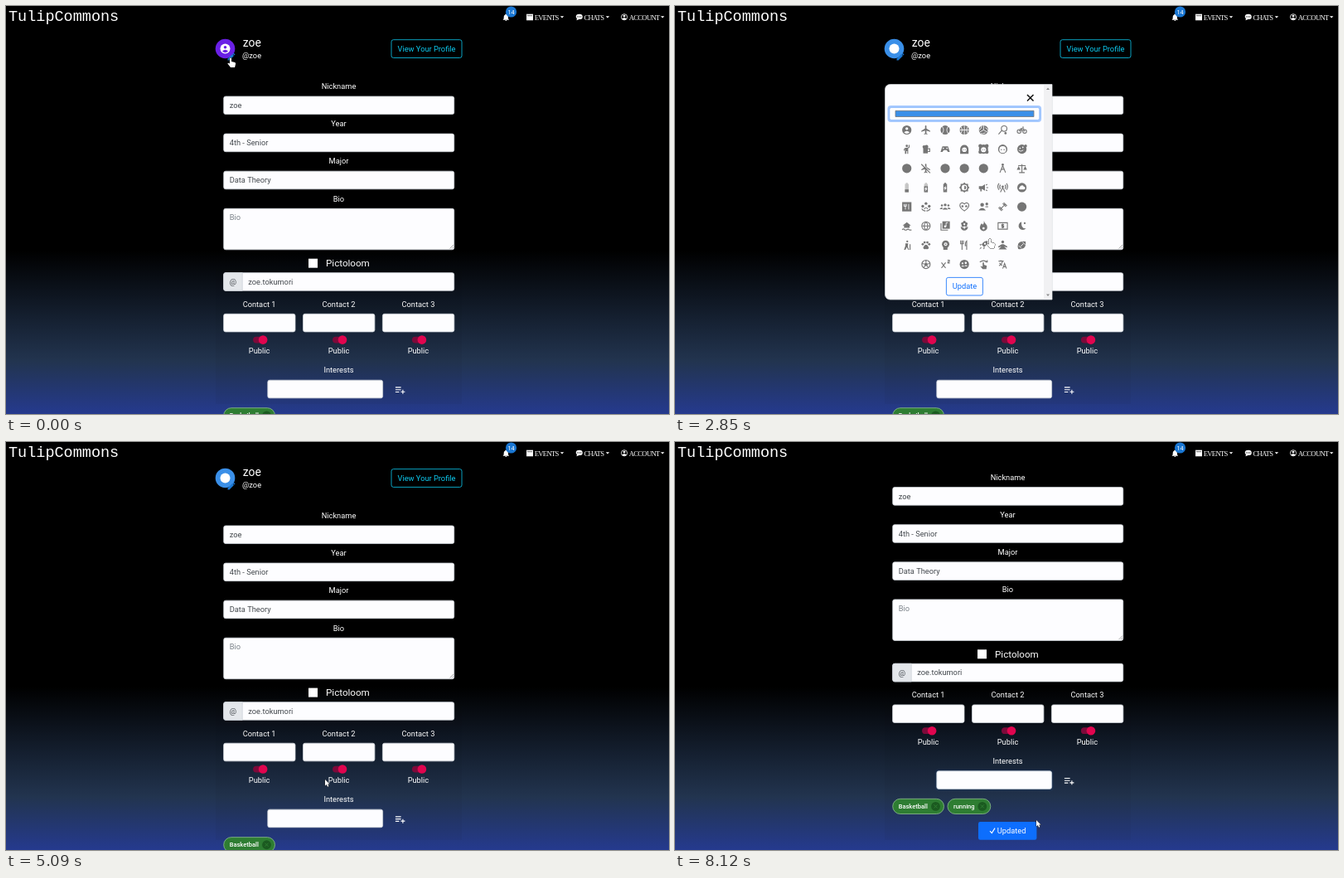
An HTML page with a canvas for the animation above (8150 ms loop, 800 by 492 pixels).

```html
<!DOCTYPE html>
<html lang="en">
<head>
<meta charset="utf-8">
<title>Profile editor</title>
<style>
html, body { margin: 0; width: 100%; height: 100%; overflow: hidden; background: #000; }
canvas { display: block; width: 800px; height: 492px; }
</style>
</head>
<body>
<canvas id="stage"></canvas>
<script>
const W = 800, H = 492, LOOP = 8150, SCROLL = 54.4;
const cv = document.getElementById('stage');
const g = cv.getContext('2d');
const dpr = window.devicePixelRatio || 1;
cv.width = W * dpr;
cv.height = H * dpr;

const SANS = 'Roboto, "Open Sans", sans-serif';
const MONO = '"Courier New", "Liberation Mono", monospace';
const SERIF = '"Liberation Serif", "Times New Roman", serif';
const GREY = '#757575', INK = '#43484d', BLUE = '#0d6efd', PAPER = '#fdfdff';

// Icon parts on a 24-unit grid: O disc, C dot, D cut-out dot,
// F fill, E pale fill, S stroke, V cut-out fill, W cut-out stroke.
const plane = 'F M21 16v-2l-8-5V3.5a1.5 1.5 0 0 0-3 0V9l-8 5v2l8-2.5V19l-2 1.5V22l3.5-1 3.5 1v-1.5L13 19v-5.5z';
const ring = 'S M3 12a9 9 0 1 0 18 0a9 9 0 1 0-18 0';
const account = 'O|D 12 9 3|V M6 17q6-5.500 12 0q-6 6-12 0z';
const eyes = '|C 10 13 1|C 14 13 1';
const dot = 'O';
const listAdd = 'S M2 7h12M2 12h12M2 17h8M18 12v9M13.500 16.500h9';
const pencil = 'F M3 17v4h4L18 10l-4-4zM15 5l4 4 2-2-4-4z';
const bell = 'F M12 22a2 2 0 0 0 2-2h-4q0 2 2 2zM18 16v-5q0-5-4-6V3h-4v2q-4 1-4 6v5l-2 2v1h16v-1z';
const battery = 'E M8 4h2V2h4v2h2v18H8z';

const rows = [
  [account, plane,
    'O|W M5 4q7 8 0 16M19 4q-7 8 0 16',
    'O|W M2 12h20M12 2v20M5 5q5 7 0 14M19 5q-5 7 0 14',
    'O|W M12 12V2M12 12l-9 5M12 12l9 5M8 3q0 7-6 10M16 7q6 3 6 8M16 18q-6 3-10 2',
    'S M9 9a6 6 0 1 0 12 0a6 6 0 1 0-12 0M10 13l-7 8|C 18 19 2.500',
    'S M2 15a4 4 0 1 0 8 0a4 4 0 1 0-8 0M14 15a4 4 0 1 0 8 0a4 4 0 1 0-8 0M6 15l4-6h5l3 6M10 9l3 5M13 6h3'],
  ['C 12 5 2.500|F M8 9h7v13h-2v-6h-2v6H8z|S M17 3v5l-4 2M8 10l-2 5',
    'F M6 9h10v12H6z|C 8 7 3.500|C 13 7 4|S M16 11h4v6h-4',
    'F M6 6h12l4 12h-4l-3-4H9l-3 4H2z|D 8 10 1.500|D 16 10 1.500',
    'F M3 22V12a9 9 0 0 1 18 0v10z|D 12 13 5' + eyes,
    'O|C 5 5 4|C 19 5 4|C 5 18 4|C 19 18 4|D 12 13 5.500' + eyes,
    'O|D 12 13 7.300|C 9 13 1.300|C 15 13 1.300',
    'O|C 20 5 3|W M5 14q4 5 10 0|D 8 10 1.500|D 14 8 1.500'],
  [dot, plane + '|W M4 2l18 18|S M2 3l19 19', dot, dot, dot,
    'S M12 6L6 21M12 6l6 15M9 14h6|C 12 4 2.500',
    'S M12 3v18M4 6h16M6 21h12|F M1 15l4-8 4 8zM15 15l4-8 4 8z'],
  [battery + '|F M8 16h8v6H8z',
    battery + '|F M8 9h8v13H8z|V M13 10l-4 5h2v5l4-6h-2z',
    'F M8 4h2V2h4v2h2v18H8z|V M13 8l-4 6h2v5l4-7h-2z',
    'F M12 1l3.300 3H20v4.700L23 12l-3 3.300V20h-4.700L12 23l-3.300-3H4v-4.700L1 12l3-3.300V4h4.700z|D 12 12 6|F M12 8a4 4 0 0 1 0 8z',
    'F M2 9h7l6-4v14l-6-4H8v5H5v-5H2z|S M18 12h4M17 7l3-2M17 17l3 2',
    'S M12 12L7 22M12 12l5 10M7 6q-3 4 0 9M17 6q3 4 0 9M4 3q-5 7 0 14M20 3q5 7 0 14|C 12 10 2.500',
    'O|V M8 16h8a3 3 0 0 0 0-6a4.500 4.500 0 0 0-8.500 1a2.600 2.600 0 0 0 .500 5z'],
  ['F M2 2h20v20H2z|W M9 6v12M16 6v12M6 6v5h5V6',
    'C 12 5 3|C 5 11 3|C 19 11 3|S M3 16q2 5 8 5M21 16q-2 5-8 5M8 17q4-6 8 0',
    'C 12 8 3|C 5 9 2.200|C 19 9 2.200|F M6 18q6-8 12 0zM0 17q4-6 7-2l-2 2zM24 17q-4-6-7-2l2 2z',
    'S M12 21Q0 13 3 6q4-5 9 0q5-5 9 0q3 7-9 15z|C 8 11 2.300|C 16 11 2.300',
    'C 9 8 4|F M1 20q8-11 16 0z|C 19 6 3|S M16 12h6',
    'S M7 17L17 7M3 14l7 7M5 12l7 7M12 5l7 7M14 3l7 7', dot],
  ['F M12 4l9 7h-3v5H6v-5H3z|S M2 20q3-3 5 0q3 2 5 0q3-2 5 0q3 2 5 0',
    ring + 'M3 12h18M12 3q-8 9 0 18M12 3q8 9 0 18',
    'F M6 2h16v16H6z|S M3 6v15h15|D 12 13 2.300|W M14 13V5h4',
    'C 12 4 3|C 8 7 3|C 16 7 3|C 9 11 3|C 15 11 3|D 12 8 2|F M4 14q1 8 8 8q7 0 8-8q-6 0-8 5q-2-5-8-5z',
    'F M13 1q1 5 4 7t3 7a8 8 0 0 1-16 0q0-5 4-9q1 3 3 3q2-3 2-8z|D 12 17 2.500',
    'S M2 5h20v14H2zM15 9h-5v3h4v3h-5M12 7v10',
    'F M11 3a9 9 0 1 0 10 14q-11 2-10-14z|C 18 6 2'],
  ['C 13 4 2|F M9 8h6l-1 7 3 7h-2l-3-6-3 6H6l3-9z|S M19 10v12',
    'C 5 10 2.500|C 9 6 2.500|C 15 6 2.500|C 19 10 2.500|F M12 11q3 0 6 6q0 5-6 3q-6 2-6-3q3-6 6-6z',
    'C 13 10 8|F M8 14h9v8H8z|D 13 10 3.500|C 13 10 1.500',
    'S M7 2v20M4 2v7h6V2M17 22V3q-3 2-3 10h3',
    'F M21 3q-9 0-13 8l5 5q8-4 8-13zM8 9l-5 2 3 2zM15 16l-2 5-2-3zM6 16l2 2-5 3z|D 15 9 2',
    'C 12 5 3|F M2 15l8-5h4l8 5-1 2-6-2 6 6H3l6-6-6 2z',
    'F M20 4Q8 2 4 9q-2 5 0 11q11 2 15-5q2-5 1-11z|W M9 15l6-6M5 13l6 6M13 5l6 6'],
  [ring + 'M12 8V4M16 11l4-1M14 15l3 4M10 15l-3 4M8 11l-4-1|F M12 8l4 3-1.500 4.500h-5L8 11z',
    'S M4 8l9 12M13 8L4 20M17 3h4v3h-3v3h4',
    'O|D 8 10 2|D 15 9 2.300|V M5 17q4-5 7 0zM12 16q3-5 7 0z',
    'S M4 7q8-6 16 0M20 3v4h-4|F M10 8h3v5l6 2-1 7h-8l-5-6 5 1z',
    'S M3 5h11M8 3v2M12 5q-2 7-8 10M5 9q3 4 6 5M12 21l4-11 4 11M13.500 17h5']
];
const cells = rows.flatMap((row, j) => row.map((art, i) =>
  ({ art, x: 279.7 + 23.15 * (i + (j === 7 ? 1 : 0)), y: 149.5 + 23.15 * j })));
const picked = cells[34];

// Pointer stops: time, x, y, shape until the next stop.
const stops = [
  [0, 271, 63, 'hand'], [200, 271, 63, 'arrow'], [560, 380, 180, 'hand'], [800, 419, 240, 'hand'],
  [960, 419, 240, 'hand'], [1270, 374, 141, 'hand'], [1430, 352, 129, 'arrow'], [1600, 352, 129, 'arrow'],
  [1800, 345, 210, 'arrow'], [2400, 400, 216, 'arrow'], [2550, 400, 216, 'hand'], [2850, 380, 281, 'hand'],
  [3150, 350, 336, 'hand'], [3500, 350, 336, 'arrow'], [4150, 390, 237, 'arrow'], [4400, 390, 237, 'arrow'],
  [4950, 385, 407, 'arrow'], [5250, 385, 407, ''], [7200, 400, 410, ''], [7380, 458, 409, 'arrow'],
  [7550, 475, 407, 'hand'], [7975, 475, 407, 'arrow'], [8120, 436, 456, 'arrow'], [LOOP, 436, 456, 'arrow']
];

const clamp = v => Math.max(0, Math.min(1, v));
const span = (t, a, b) => clamp((t - a) / (b - a));
const ease = v => v * v * (3 - 2 * v);
const mix = (a, b, p) => a + (b - a) * p;

function circle(x, y, r, color) {
  g.fillStyle = color;
  g.beginPath();
  g.arc(x, y, r, 0, 7);
  g.fill();
}

function box(x, y, w, h, r, fill, edge) {
  g.beginPath();
  g.roundRect(x, y, w, h, r);
  if (fill) { g.fillStyle = fill; g.fill(); }
  if (edge) { g.strokeStyle = edge; g.lineWidth = 0.8; g.stroke(); }
}

function line(d, color, width) {
  g.strokeStyle = color;
  g.lineWidth = width;
  g.stroke(new Path2D(d));
}

function text(s, x, y, { size = 9.28, color = '#fff', align = 'left', font = SANS, weight = 400, gap = 0 } = {}) {
  g.font = `${weight} ${size}px ${font}`;
  g.letterSpacing = gap + 'px';
  g.textAlign = align;
  g.fillStyle = color;
  g.fillText(s, x, y + size * 0.355);
  g.letterSpacing = '0px';
}
const label = (s, x, y, size) => text(s, x, y, { align: 'center', size });

function icon(art, x, y, k, fg, bg) {
  g.save();
  g.translate(x - 12 * k, y - 12 * k);
  g.scale(k, k);
  for (const part of art.split('|')) {
    const kind = part[0], rest = part.slice(2);
    if (kind === 'O') circle(12, 12, 10, fg);
    else if (kind === 'C' || kind === 'D') {
      const [cx, cy, r] = rest.split(' ').map(Number);
      circle(cx, cy, r, kind === 'C' ? fg : bg);
    } else if (kind === 'S' || kind === 'W') line(rest, kind === 'S' ? fg : bg, kind === 'S' ? 2 : 1.5);
    else {
      g.fillStyle = kind === 'V' ? bg : kind === 'E' ? '#c6c6c6' : fg;
      g.fill(new Path2D(rest));
    }
  }
  g.restore();
}

function field(x, y, w, h, glow = 0) {
  if (glow > 0) box(x - 2.3, y - 2.3, w + 4.6, h + 4.6, 4, `rgba(13,110,253,${0.36 * glow})`);
  box(x, y, w, h, 2.3, PAPER, glow > 0 ? `rgba(${mix(206, 134, glow)},${mix(212, 183, glow)},${mix(218, 254, glow)},1)` : '#ced4da');
}

function chip(s, x, w) {
  box(x, 484.7, w, 18.2, 9.1, '#2e7d32', '#8fbf8f');
  text(s, x + 7, 493.8, { size: 7.5, weight: 500 });
  circle(x + w - 10, 493.8, 5.4, '#1b5a20');
  const a = x + w - 12;
  line(`M${a} 491.8l4 4m0-4l-4 4`, '#2e7d32', 1);
}

function backdrop() {
  const sky = g.createLinearGradient(0, 0, 0, H);
  sky.addColorStop(0, '#000');
  sky.addColorStop(0.6, '#000');
  sky.addColorStop(0.87, '#22344f');
  sky.addColorStop(1, '#253a8e');
  g.fillStyle = sky;
  g.fillRect(0, 0, W, H);
  g.fillStyle = 'rgba(0,0,0,.04)';
  g.fillRect(253, 0, 297, 480);
}

function page(t, tint) {
  circle(264.5, 51.5, 11.8, tint);
  icon(t < 900 ? account : dot, 264.5, 51.5, 0.6, '#fff', tint);
  icon(pencil, 272, 61, 0.5, '#1976d2');
  text('zoe', 285.7, 44.5, { size: 13.9 });
  text('@zoe', 285, 60);
  box(465, 40.7, 85, 21.8, 2.5, null, '#0dcaf0');
  text('View Your Profile', 507.5, 51.5, { color: '#0dcaf0', align: 'center' });

  [['Nickname', 'zoe'], ['Year', '4th - Senior'], ['Major', 'Data Theory']].forEach(([name, value], i) => {
    const y = 97 + 45.1 * i;
    label(name, 401.5, y);
    field(262.7, y + 12, 278, 21.6);
    text(value, 269.7, y + 22.7, { color: INK });
  });
  label('Bio', 401.5, 232.3);
  field(262.7, 244.3, 278, 49.5);
  text('Bio', 269.7, 255, { color: '#7b8289' });
  line('M535.500 292.500l4.500-4.500m-2 4.500l2-2', '#777', 0.6);

  g.fillStyle = '#fff';
  g.fillRect(365, 304.7, 11, 11);
  text('Pictoloom', 386, 310.3, { size: 11.6 });
  field(262.7, 321.7, 278, 21.6);
  box(262.7, 321.7, 22.5, 21.6, [2.3, 0, 0, 2.3], '#e4e7eb', '#ced4da');
  text('@', 274, 332.7, { color: INK, align: 'center' });
  text('zoe.tokumori', 292.3, 332.3, { color: INK });

  for (let i = 0; i < 3; i++) {
    const x = 305.6 + 95.9 * i;
    label('Contact ' + (i + 1), x, 359.3);
    field(x - 43, 371.3, 86.4, 21.6);
    box(x - 7.5, 398.7, 17, 7.8, 3.9, '#7d0a3a');
    circle(x + 4.5, 402.6, 5.3, '#e0054f');
    label('Public', x, 416);
  }

  label('Interests', 401.5, 439.2);
  const focus = span(t, 5320, 5480) * (1 - span(t, 7975, 8140));
  field(315.8, 451.2, 138.8, 21.6, focus);
  const typed = t < 7975 ? 'running'.slice(0, Math.max(0, Math.floor((t - 5800) / 150))) : '';
  text(typed, 323, 462, { color: INK });
  const since = t < 5950 ? t - 5300 : t < 6850 ? 0 : t - 6850;
  if (t >= 5300 && t < 7975 && since % 1000 < 500) {
    g.fillStyle = '#222';
    g.fillRect(323.2 + g.measureText(typed).width, 456, 0.8, 12);
  }
  if (t > 7500 && t < 8100) circle(475.5, 462.7, 11.6, 'rgba(255,255,255,.05)');
  icon(listAdd, 475.5, 462.7, 0.56, '#fff');

  chip('Basketball', 262.7, 61.8);
  if (t >= 7975) chip('running', 329, 51.8);
  box(366, 512.5, 70.4, 21.6, 2.3, BLUE);
  line('M380 523.500l2.300 2.500l3.700-6', '#fff', 1.1);
  text('Updated', 388.8, 523.2);
}

function navItem(s, x, art) {
  icon(art, x, 13.3, 0.4, '#fff', '#000');
  text(s, x + 5.8, 13.5, { size: 8.6, font: SERIF, gap: -0.7 });
}

function nav() {
  g.fillStyle = '#000';
  g.fillRect(0, 0, W, 27);
  text('TulipCommons', 3, 11.3, { size: 18.5, font: MONO });
  icon(bell, 603.3, 13.6, 0.44, '#fff');
  circle(609.5, 7, 6.6, '#1976d2');
  label('14', 609.5, 7.1, 7.2);
  navItem('EVENTS', 632, 'F M2 3h20v19H2z|W M4 8h16');
  navItem('CHATS', 691.7, 'F M12 3q10 0 10 8t-10 8l-8 3 1-6q-3-2-3-5q0-8 10-8z|D 7 11 1.500|D 12 11 1.500|D 17 11 1.500');
  navItem('ACCOUNT', 746, ring + '|C 12 9 3.500|F M5 18q7-7 14 0q-7 5-14 0z');
  g.fillStyle = '#fff';
  for (const x of [668.8, 723.7, 790]) g.fill(new Path2D(`M${x} 12.200h4.400l-2.200 2.300z`));
}

function picker(t, tint, p, pos) {
  const L = 253.5, T = 94.5;
  g.save();
  g.globalAlpha = p;
  g.translate(L, T);
  g.scale(mix(0.75, 1, p), mix(0.5625, 1, p));
  g.translate(-L, -T);
  box(L, T, 201.5, 259.5, [6, 0, 0, 6], PAPER, '#cfd2d6');
  g.fillStyle = '#f1f1f3';
  g.fillRect(445, 95, 9.7, 258.6);
  g.fillStyle = '#8a8a8a';
  g.fill(new Path2D('M448 101h4l-2-2.500zM448 347.500h4l-2 2.500z'));
  line('M425 107l7.500 7.500m0-7.500l-7.500 7.500', '#111', 1.5);

  field(258.8, 122.4, 181, 15.2, span(t, 1450, 1600));
  box(266, 126.3, 167, 7.2, 0, tint, '#777');

  for (const c of cells) {
    if (c === picked && t > 900 && t < 1450) circle(c.x, c.y, 10.6, 'rgba(0,0,0,.065)');
    else if (pos.shape === 'hand' && Math.hypot(c.x - pos.x, c.y - pos.y) < 10) circle(c.x, c.y, 10.6, 'rgba(0,0,0,.045)');
    icon(c.art, c.x, c.y, 0.56, GREY, PAPER);
  }
  const over = pos.shape === 'hand' && t > 3050;
  box(327.4, 327.4, 44, 21.6, 2.3, over ? BLUE : null, BLUE);
  text('Update', 349.4, 338.2, { color: over ? '#fff' : BLUE, align: 'center' });
  g.restore();
}

function pointer(t) {
  let i = 0;
  while (i < stops.length - 2 && stops[i + 1][0] <= t) i++;
  const [a, ax, ay, shape] = stops[i], [b, bx, by] = stops[i + 1];
  const p = ease(span(t, a, b));
  return { x: mix(ax, bx, p), y: mix(ay, by, p), shape };
}

function drawPointer({ x, y, shape }) {
  if (!shape) return;
  const d = shape === 'hand'
    ? 'M-1 0q1-1 2 0v4l4 1q1.500.500 1 2l-1 4h-5l-3.500-4.500q0-1.500 2.500 0z'
    : 'M0 0v7.500l1.800-1.600 1.300 2.800 1.300-.600-1.300-2.700h2.400z';
  const path = new Path2D(d);
  g.save();
  g.translate(x, y);
  g.fillStyle = '#fff';
  g.strokeStyle = '#222';
  g.lineWidth = 0.9;
  g.stroke(path);
  g.fill(path);
  g.restore();
}

function draw(t) {
  g.setTransform(dpr, 0, 0, dpr, 0, 0);
  const hue = ease(span(t, 1750, 2350));
  const tint = `rgb(${mix(106, 58, hue)},${mix(32, 143, hue)},${mix(230, 232, hue)})`;
  const pos = pointer(t);
  backdrop();
  g.save();
  g.translate(0, -SCROLL * ease(span(t, 5040, 5250)));
  page(t, tint);
  g.restore();
  nav();
  const open = ease(span(t, 200, 400)) * (1 - ease(span(t, 3430, 3600)));
  if (open > 0) picker(t, tint, open, pos);
  drawPointer(pos);
}

const start = performance.now();
function tick() {
  draw((performance.now() - start) % LOOP);
  requestAnimationFrame(tick);
}
tick();
</script>
</body>
</html>
```
